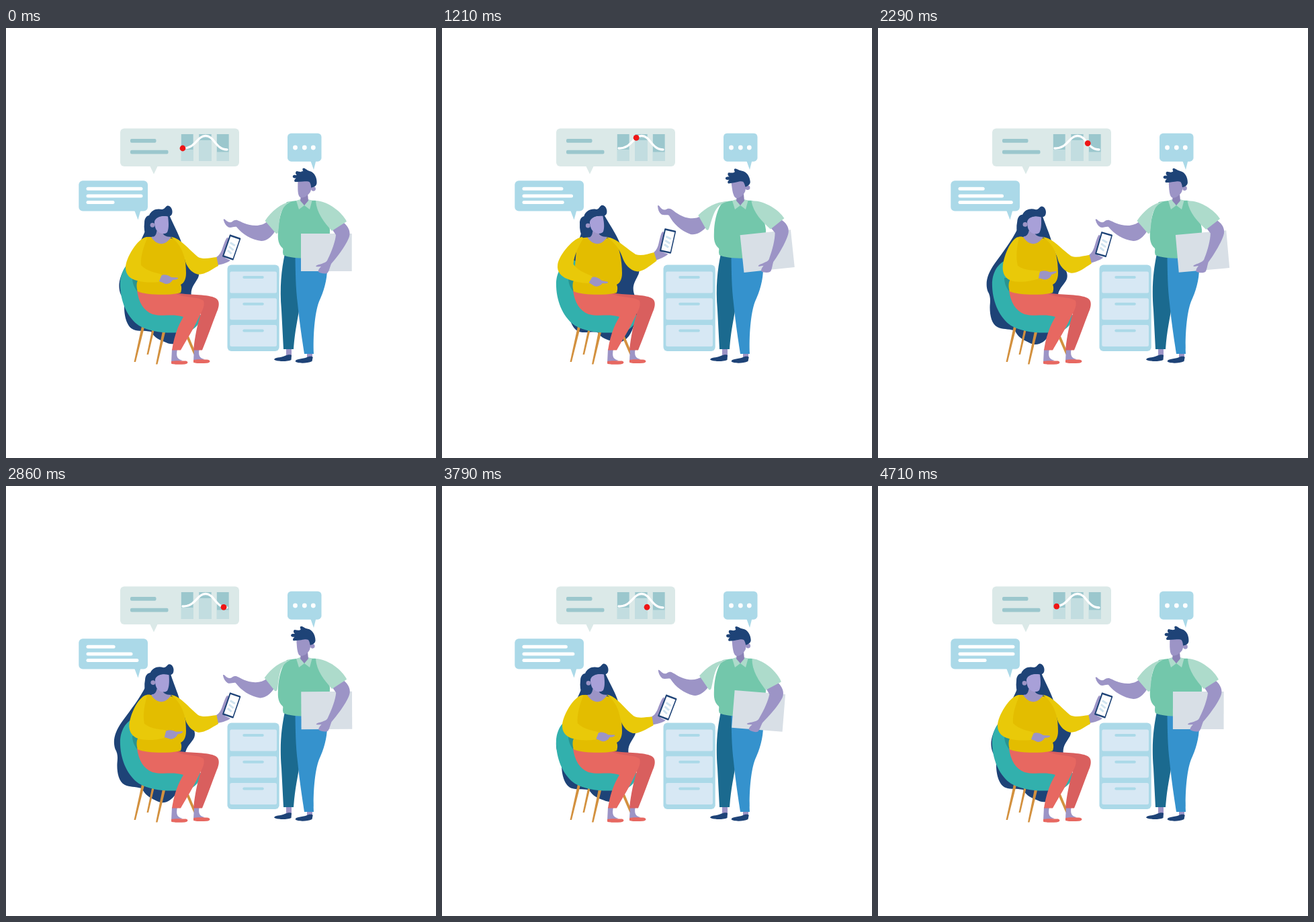
An HTML page for the animation above (4.78 s loop, 640 px wide and 640 px high).

```html
<!DOCTYPE html>
<html lang="en">
<head>
<meta charset="utf-8">
<style>
  html, body { margin: 0; width: 100%; height: 100%; overflow: hidden; background: #fff; }
  svg { display: block; width: 100vw; height: 100vh; }
  .skin { fill: #9c94c6; }
  .navy { fill: #1e4377; }
  .sky { fill: #abd9e8; }
  .pale { fill: #d7e8f4; }
  .mist { fill: #dbe9e8; }
  .steel { fill: #9bc7cd; }
  .haze { fill: #c2dde0; }
  .coral { fill: #e76861; }
  .brick { fill: #d95f5e; }
  .gold { fill: #e3bd00; }
  .sun { fill: #e9c909; }
  .mint { fill: #addbcb; }
  .white { fill: #fff; }
</style>
</head>
<body>
<svg viewBox="0 0 640 640">
  <!-- chart bubble -->
  <path class="mist" d="M214 205H226L220 217.500Z"/>
  <rect class="mist" x="170" y="149.500" width="177" height="56.500" rx="6"/>
  <rect class="steel" x="185" y="165" width="38.500" height="5.800" rx="2"/>
  <rect class="steel" x="185" y="181.700" width="56.500" height="5.800" rx="2"/>
  <path class="haze" d="M260.500 158H279V198H260.500ZM287 158H306V198H287ZM313.500 158H332V198H313.500Z"/>
  <path class="steel" d="M261 158H278.500V181H261ZM287.500 158H305.500V167H287.500ZM314 158H331.500V184.500H314Z"/>
  <path id="curve" fill="none" stroke="#fff" stroke-width="3.300" stroke-linecap="round" d="M263 179C282 180 284 160.500 297 160.500C310 160.500 312 181 329 181"/>
  <circle id="dot" r="4.400" fill="#ee1616"/>

  <!-- text bubble -->
  <path class="sky" d="M191 271H200.500L196.500 285.500Z"/>
  <rect class="sky" x="108.300" y="227.300" width="102.700" height="45.200" rx="6"/>
  <g id="lines" class="white">
    <rect x="119.500" y="236.700" height="5" rx="2.500"/>
    <rect x="119.500" y="247.400" height="5" rx="2.500"/>
    <rect x="119.500" y="257" height="5" rx="2.500"/>
  </g>

  <!-- dots bubble -->
  <path class="sky" d="M453 197H461.500L458 211Z"/>
  <rect class="sky" x="419" y="156.700" width="50.500" height="42" rx="5.500"/>
  <g class="white">
    <circle cx="430.500" cy="178" r="3.400"/><circle cx="444.300" cy="178" r="3.400"/><circle cx="457.300" cy="178" r="3.400"/>
  </g>

  <!-- cabinet -->
  <rect class="sky" x="329.500" y="352.500" width="77.200" height="128.500" rx="6"/>
  <g id="drawer">
    <rect class="pale" x="333.300" y="362.500" width="69.700" height="32" rx="2.500"/>
    <rect class="sky" x="352.300" y="369" width="31.500" height="4" rx="2"/>
  </g>
  <use href="#drawer" y="39.800"/>
  <use href="#drawer" y="79.600"/>

  <!-- man -->
  <path class="skin" d="M417 476H425V489H417ZM448 483H456V492H448Z"/>
  <path class="navy" d="M399 493.500C400 490 408 491 415 488C419 486 424 486 425 487L424.500 494C418 497 402 496.500 399 493.500ZM430.500 496C432 492 440 493 447 490.500C451 488 456 488.500 456.700 490L455.500 496C448 499.500 433 499.500 430.500 496Z"/>
  <path fill="#1b6a8f" d="M415 336C410 360 407 385 410 420L413 478H428C430 450 434 435 437 415L434 340Z"/>
  <path fill="#3592cd" d="M430.500 340C431 365 431 385 434 410C437 440 441 465 444 485H458C457 460 459 425 466 407C473 392 478 375 478 358L477 338Z"/>
  <path fill="#73c7ab" d="M418 259C430 256 455 256 462 257C475 268 480 285 482 300C482 315 480 330 478 340C465 344 425 344 413 338C411 333 413 330 412 328C403 320 405 310 405 300C406 285 410 268 418 259Z"/>
  <g id="manLeft">
    <path class="skin" d="M400 303C395 311 388 317 380 317C365 315 352 307 343 296C340 295 335 298 331 296.500C327 294 325 290 324 286.500C323 284 325 284 327 286C330 289 334 290.500 337 288C339 286 342 285.500 344 286C350 288 358 294 372 294C378 294 385 292 390 287Z"/>
    <path class="mint" d="M426 258C408 261 395 273 385.500 287L401.500 305.500Q404 307 405 304C406 300 406 290 408 280C410 270 415 262 426 258Z"/>
  </g>
  <path class="mint" d="M432 257L438 255L444 264L450 255L455.500 257L452 270L444 264L436 270Z"/>
  <path fill="#8b82b6" d="M439 248L449 247L450 257L444 264L438 257Z"/>
  <g id="manHead">
    <path class="skin" d="M434.500 227C434 240 434 250 438 252C443 254 450 249 453 244L456 235L453 226Z"/>
    <circle class="skin" cx="457.500" cy="239.300" r="3.400"/>
    <path class="navy" d="M430 229C428 227 430 225 432 223.500C428 224 426 222 427 220C428 218 431 219 433 219C430 217 431 213 433 213C437 214 440 215 442 213C441 210 441 209 443 208.500C446 209 448 212 452 213C460 215 463 224 462.500 231C462 235 459 236 457 237C455 237 454.500 238.500 454 237C454 234 453 231 452 229.500C448 227 443 229.500 430 229Z"/>
  </g>
  <g id="manRight">
    <rect x="439" y="306" width="75.700" height="56" fill="#d8dfe6"/>
    <path class="skin" d="M485 299L503 290C512 298 513 306 510 313C505 325 492 342 484 351C482 356 481 361 479 364C476 367 468 365 465 363C464 361 466 358 469 355C465 355 463 356 461 354.500C463 352 468 352 472 350C476 349 478 347 479 344C485 332 490 318 491 308Z"/>
    <path class="mint" d="M461 257C480 258 500 274 507 288L485 302C474 290 462 275 461 257Z"/>
  </g>

  <!-- woman -->
  <path id="hair" class="navy" d="M242 276C250 295 258 308 262 322C270 340 280 350 284 356C288 362 288.500 369 284 375C280 382 274 388 276 400C282 420 280 435 270 450C262 468 250 474 238 468C228 464 222 462 216 452C205 450 198 452 190 449C180 445 176.500 430 176 418C176 410 176 404 171 397C166 385 168 372 178 355C190 335 200 320 208 300Z"/>
  <path fill="#d3913f" d="M202 444H206.300L193 497H190.500ZM217.500 448H221L212 486H209.500ZM233 451H237.500L225.500 500.500H223ZM266.500 456L270 454L283 485L279.500 486Z"/>
  <path fill="#32b0ad" d="M192 345C178 350 169 365 170 385C171 410 182 432 198 443C218 455 255 456 275 450C285 446 290 435 290.500 428L250 400L215 350Z"/>
  <path fill="#2a9390" d="M188 372C188 380 191 387 196 393V372Z"/>
  <g id="foot">
    <path class="skin" d="M247 478H255C253 488 254 493 263 495L246 498Z"/>
    <path class="coral" d="M246 496C252 494.500 262 495.500 268 495.500C272 497 271 500 266 500.500C258 501 248 501 246 499.500Z"/>
  </g>
  <use href="#foot" x="33" y="-1.800"/>
  <path class="brick" d="M250 394C275 398 300 396 312 402C319 406 317 415 314 422C307 440 300 460 292 479.500H279C281 460 285 440 290 425L255 420Z"/>
  <path class="coral" d="M195 390L250 394C262 402 288 400 294 406C297 414 290 424 285 435C278 450 268 465 260 479.500H247C250 460 255 445 264 430C250 425 232 430 218 426C205 421 197 408 195 390Z"/>
  <path class="gold" d="M209 311C215 309 220 314 230 313C240 312 248 312 258 317C264 328 268 345 268 365C268 375 264 380 260 382C262 386 261 391 260 394C245 398 210 398 196 392C194 386 194 380 196 376L200 330Z"/>
  <path class="skin" d="M216 311C223 308 226 302 225 296L233 302C232 308 238 311 246 311C238 324 225 325 216 311Z"/>
  <g id="phoneArm">
    <path class="skin" d="M313 341C317 339 320 334 322 328C325 320 327 313 330 311.500L333 318L326 342L334 346C328 350 320 352 315 353Z"/>
    <g transform="translate(335.700 326.500) rotate(19)">
      <rect class="navy" x="-8.700" y="-17.500" width="17.400" height="35" rx="1"/>
      <rect class="white" x="-6.700" y="-15" width="13.800" height="30"/>
      <path d="M-4 -6L4 -4M-4 0L4 3M-4 6L3 9" stroke="#d0e4f0" stroke-width="3"/>
    </g>
    <path class="sun" d="M245 311C258 311 272 330 286 341C294 345 304 342 313.500 341L316 354C305 360 295 368 285 366.500C275 364 268 354 266 344C263 330 256 318 245 311Z"/>
  </g>
  <g id="restArm">
    <path class="skin" d="M230 369C234 366 241 367 246 371L255.500 371.500C257 372.500 256 374.500 248 375C246 379 241 382 236 380.500C232 378 229 378 227 376Z"/>
    <path class="sun" d="M209 311C196 313 178 342 178 357C178 368 186 374 195 376C205 379 218 379 227.500 378L232 367C225 364 210 363 201 353C200 340 205 325 210 313Z"/>
  </g>
  <g id="womanHead">
    <path class="navy" d="M206 290C206 282 210 279.500 213 279C216 271 224 268 232 270C236 270 237 266 240 264.500C246 264 249 272 247 277C245 281 242 280 240 281C230 279 224 282 221 290L223 298C225 303 224 308 220 310.500L209 311C206 305 205 298 206 290Z"/>
    <circle class="skin" cx="218" cy="293.300" r="3.400"/>
    <path fill="#a8a0d8" d="M221 288C223 281 232 279 241 280.500C242 288 243 298 240 304C236 308 228 306 225 302C222 299 221 293 221 288Z"/>
  </g>
</svg>
<script>
const LOOP = 4780, FPS = 14;
const times = [0, 570, 1210, 2290, 2860, 3430, 4210, 4710];
// pivot x, pivot y, angles at the times above
const joints = {
  manLeft: [425, 262, [0, 5.5, 11.5, 0, 2, 5.5, 5.5, 0]],
  manRight: [463, 263, [0, -2, -6, -5, -0.3, 4.5, 3.4, 0.1]],
  manHead: [445, 255, [0, -4, -8.5, -3.7, -4.6, -6.4, -5.3, -0.2]],
  hair: [230, 300, [0, -3, -5.7, 4.7, 5.2, 0, -1.2, 0]],
  womanHead: [230, 305, [0, -2, -3.8, 4.4, 3.6, 0.7, -0.3, 0]],
  restArm: [209, 315, [0, 10.5, 8.5, -10.5, -7.3, -2.4, -0.7, 0]],
  phoneArm: [250, 318, [0, -2.2, -6.3, -2.9, 0, 2.4, 1, 0]],
};
const el = id => document.getElementById(id);
const curve = el('curve'), dot = el('dot'), lines = el('lines').children;
const mix = (a, b, u) => a + (b - a) * u;

// Periodic cubic through the key values
function spline(values, t) {
  const n = times.length;
  const at = i => times[(i + n) % n] + LOOP * Math.floor(i / n);
  const val = i => values[(i + n) % n];
  const slope = i => (val(i + 1) - val(i - 1)) / (at(i + 1) - at(i - 1));
  let i = 0;
  while (at(i + 1) <= t) i++;
  const h = at(i + 1) - at(i), u = (t - at(i)) / h, v = 1 - u;
  return val(i) * v * v * (1 + 2 * u) + val(i + 1) * u * u * (3 - 2 * u)
    + h * u * v * (v * slope(i) - u * slope(i % n + 1 === n ? 0 : i + 1));
}

function moveDot(t) {
  const length = curve.getTotalLength();
  let { x, y } = curve.getPointAtLength(length * Math.min(1, t / 3050));
  const back = Math.max(0, (t - 3220) / (LOOP - 3220));
  x = mix(x, 263, back);
  y = mix(y, 179, back);
  dot.setAttribute('cx', x);
  dot.setAttribute('cy', y);
}

function draw(now) {
  const step = Math.floor((now % LOOP + 5) * FPS / 1000);
  const t = step * 1000 / FPS % LOOP;
  for (const [id, [x, y, angles]] of Object.entries(joints))
    el(id).setAttribute('transform', `rotate(${spline(angles, t)} ${x} ${y})`);
  const wave = (1 - Math.cos(2 * Math.PI * t / LOOP)) / 2;
  [[84, 39], [84, 67.5], [42, 81.5]].forEach(([from, to], i) =>
    lines[i].setAttribute('width', mix(from, to, wave)));
  moveDot(t);
}

const start = performance.now();
function tick() {
  draw(performance.now() - start);
  requestAnimationFrame(tick);
}
tick();
</script>
</body>
</html>
```
